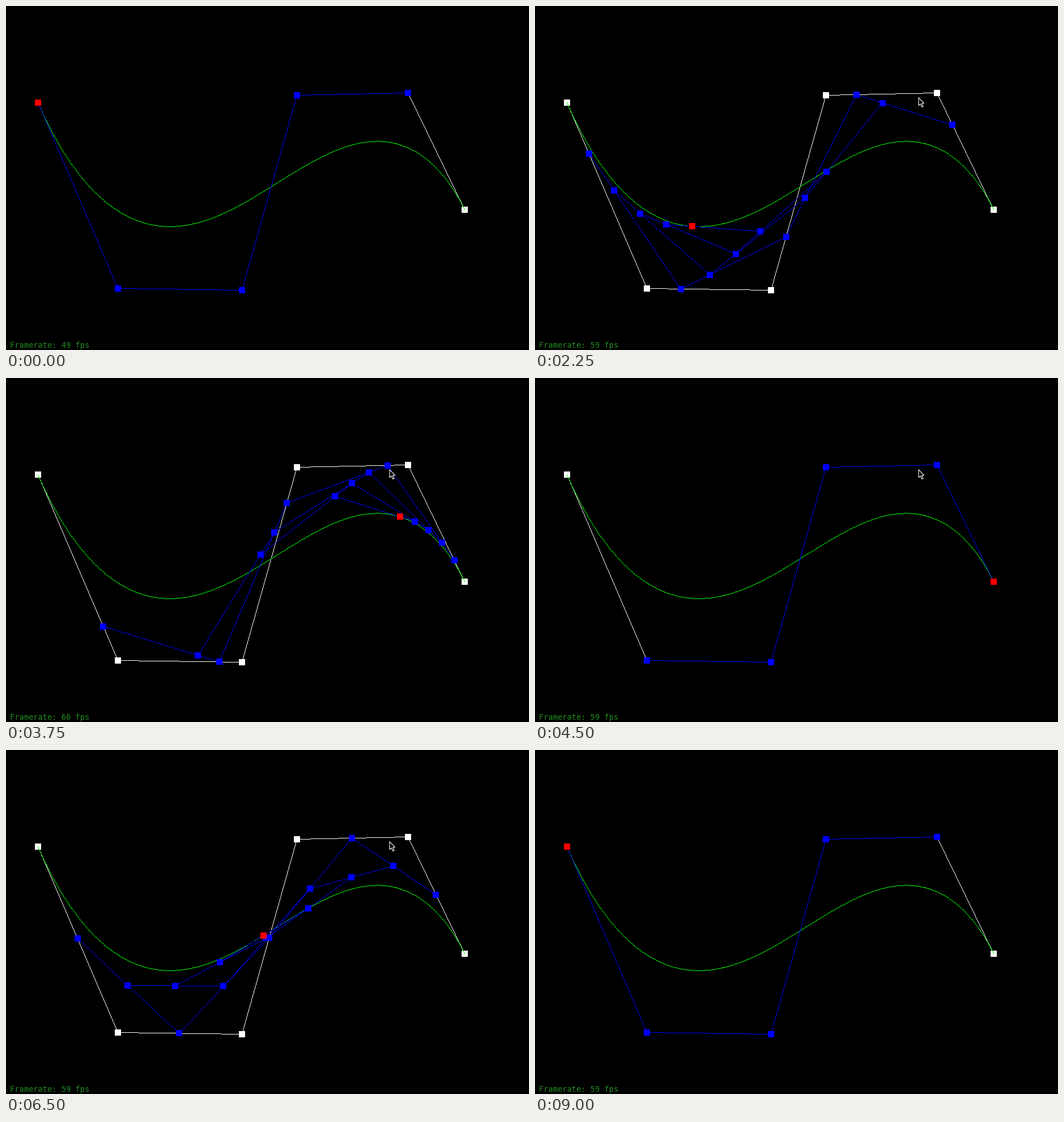
Animation of 923x607 px, one loop 9500 ms. Source, as a matplotlib script:

```python
import numpy as np
import matplotlib.pyplot as plt
from matplotlib.animation import FuncAnimation
from matplotlib.patches import Polygon

W, H, DPI = 923, 607, 64
STEP, FRAMES = 250, 38
PX = 72 / DPI  # one pixel in points
WHITE, GREEN, BLUE, RED = (255, 255, 255), (0, 255, 0), (0, 0, 255), (255, 0, 0)

CTRL = np.array([(56, 170), (197, 498), (416, 501),
                 (513, 157), (709, 153), (809, 359)], float)

# Key times (s) and curve parameter: out along the curve and back
KEYS = np.array([(.75, 0), (1.5, .067), (2.75, .457), (3.75, .8165), (4.5, 1),
                 (4.75, 1), (5.5, .841), (6.5, .4935), (7.25, .155), (7.75, 0)])

CURSOR = [(0, None), (.25, (696, 28)), (.5, (676, 161)),
          (8.25, (124, 0)), (8.5, None)]
ARROW = np.array([(1, .8), (1, 14.6), (4.4, 11.8), (6.7, 17.3),
                  (9, 16.3), (6.7, 11), (10.5, 10.6)])


def param(s):
    """Cosine easing: the phase runs evenly from key to key."""
    phase = np.interp(s, KEYS[:, 0], np.arccos(1 - 2 * KEYS[:, 1]))
    return (1 - np.cos(phase)) / 2


def levels(u):
    """De Casteljau: the point rows below the control polygon."""
    rows, pts = [], CTRL
    while len(pts) > 1:
        pts = (1 - u) * pts[:-1] + u * pts[1:]
        rows.append(pts)
    return rows


def polyline(img, pts, color):
    """Hard one-pixel line, one sample per pixel of the longer axis."""
    for a, b in zip(pts[:-1], pts[1:]):
        n = int(np.ceil(abs(b - a).max())) + 1
        x, y = np.rint(np.linspace(a, b, n)).astype(int).T
        img[y, x] = color


def squares(img, pts, color, r=5):
    for x, y in np.rint(pts).astype(int):
        img[y - r:y + r + 1, x - r:x + r + 1] = color


def fps(s):
    """Counter refreshed once a second."""
    if s < 1:
        return 49
    return 60 if int(s) % 5 == 3 else 59


base = np.zeros((H, W, 3), np.uint8)
polyline(base, CTRL, WHITE)
squares(base, CTRL, WHITE)
polyline(base, [levels(u)[-1][0] for u in np.linspace(0, 1, 101)], GREEN)

fig = plt.figure(figsize=(W / DPI, H / DPI), dpi=DPI, facecolor="black")
ax = fig.add_axes([0, 0, 1, 1])
ax.axis("off")
view = ax.imshow(base, extent=(0, W, H, 0), aspect="auto", interpolation="nearest")
arrow = ax.add_patch(Polygon(ARROW, closed=True, fc="black", ec="white",
                             lw=1.1 * PX, joinstyle="round"))
label = ax.text(6.9, 603, "", family="DejaVu Sans Mono", size=13.6 * PX,
                color="#228b22", va="baseline")
ax.set(xlim=(0, W), ylim=(H, 0))


def update(frame):
    s = frame * STEP / 1000
    *rows, tip = levels(param(s))
    img = base.copy()
    for row in rows:
        polyline(img, row, BLUE)
    squares(img, np.vstack(rows), BLUE)
    squares(img, tip, RED)
    view.set_data(img)

    pos = [p for start, p in CURSOR if start <= s][-1]
    arrow.set_visible(pos is not None)
    if pos:
        arrow.set_xy(ARROW + pos)
    label.set_text(f"Framerate: {fps(s)} fps")
    return view, arrow, label


anim = FuncAnimation(fig, update, frames=FRAMES, interval=STEP,
                     repeat=True, repeat_delay=0, blit=False)
plt.show()
```
